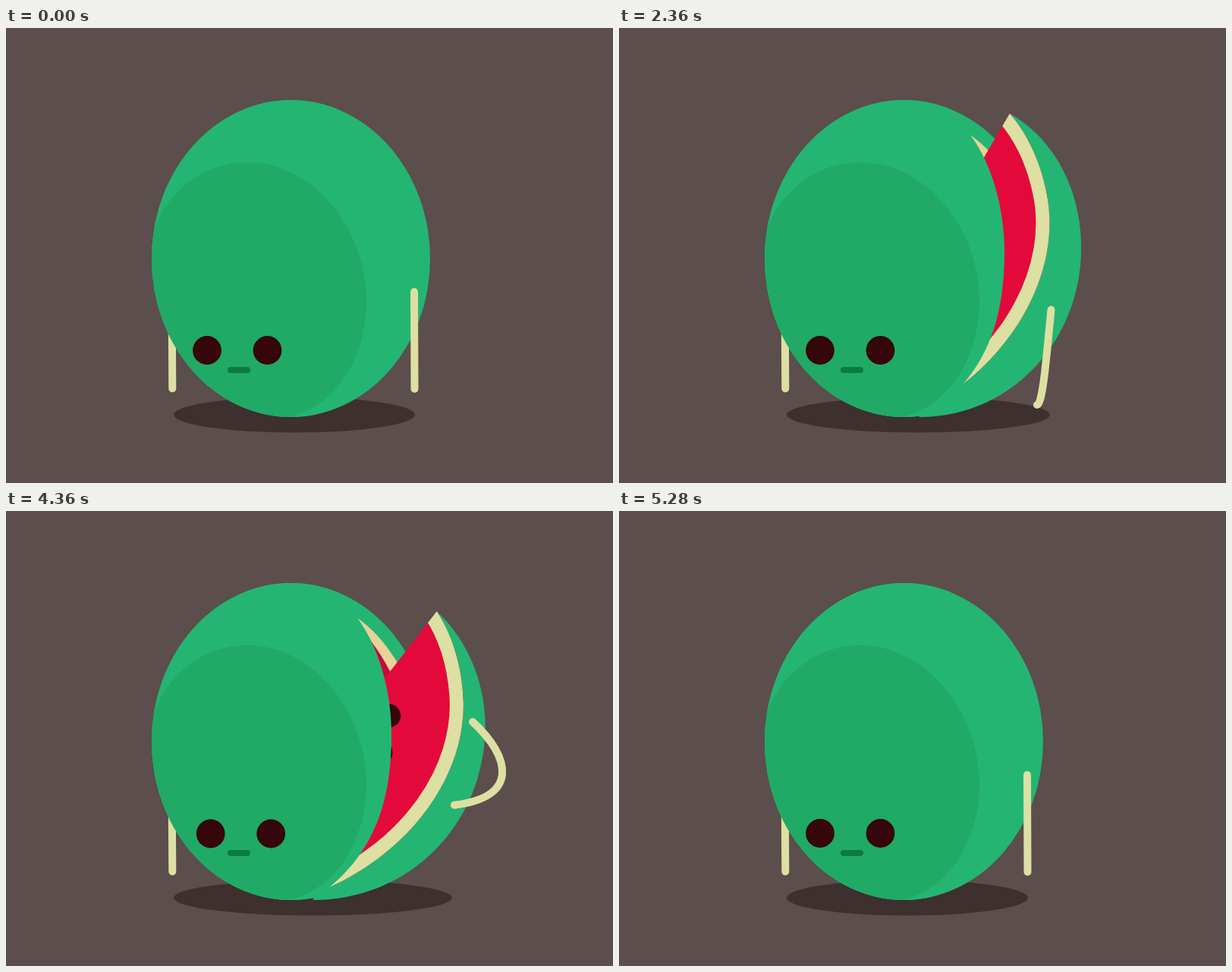
An HTML page for the animation above (5480 ms loop, 800x600 px).

```html
<!DOCTYPE html>
<html lang="en">
<head>
<meta charset="utf-8">
<title>Melon</title>
<style>
  html, body { margin: 0; width: 100%; height: 100%; overflow: hidden; background: #5b4e4c; }
  svg { display: block; width: 800px; height: 600px; }
  .limb { fill: none; stroke: #dedfa2; stroke-width: 10; stroke-linecap: round; }
  .rind { fill: #24b573; }
  .flesh { fill: #e3093b; }
  .dark { fill: #36070a; }
</style>
</head>
<body>
<svg viewBox="0 0 800 600">
  <defs>
    <clipPath id="body"><ellipse cx="375.5" cy="304" rx="183.5" ry="209"/></clipPath>
    <path id="wedge" d="M598 147C615 178 624 216 624 258C624 362 540 462 420 502L395 508L450 310Z"/>
    <clipPath id="wedgeClip"><use href="#wedge"/></clipPath>
  </defs>

  <ellipse id="shadow" cy="510" ry="23.5" fill="#3d302f"/>
  <path class="limb" d="M218.8 390L219.3 475.5"/>
  <ellipse class="rind" cx="375.5" cy="304" rx="183.5" ry="209"/>

  <g id="opening">
    <path fill="#e8d298" d="M463 141C490 160 513 190 528 224L540 300H480Z"/>
    <path fill="#c8083a" d="M463 150C485 174 504 202 517 236L528 300H480Z"/>
    <path id="outer" class="rind"/>
    <g id="face">
      <use href="#wedge" class="flesh"/>
      <g class="dark">
        <circle cx="524.5" cy="279.5" r="15.5"/>
        <path d="M490 280L505 272.5L518 265.5V294L505 288Z"/>
        <circle cx="508.5" cy="327" r="17"/>
      </g>
      <path clip-path="url(#wedgeClip)" fill="none" stroke="#dedfa2" stroke-width="36"
        d="M578 115L598 147C615 178 624 216 624 258C624 362 540 462 420 502L395 508"/>
    </g>
  </g>

  <g clip-path="url(#body)">
    <path class="rind" d="M0 0H380L420 85L463 141C492 180 508 238 508 295C508 375 490 452 412 507L395 525H0Z"/>
    <path fill="#20aa66" d="M318 177C405 177 475 265 475 360C475 435 435 500 370 514H150V330L194 268C215 210 265 177 318 177Z"/>
  </g>

  <g id="eyes" class="dark">
    <circle cx="-39.75" r="18.9"/>
    <circle cx="39.75" r="18.9"/>
  </g>
  <path d="M296 451H318" stroke="#0b7b42" stroke-width="8" stroke-linecap="round"/>
  <path id="arm" class="limb"/>
</svg>

<script>
  const LOOP = 5480, STEP = 40;
  const PIVOT = [391, 530], REACH = 435, SWING = 28.4;

  // Arm poses: shoulder, two curve handles, hand.
  const REST = [538, 348, 538, 391, 538.5, 433, 538.5, 476];
  const DROP = [569.5, 371.5, 563, 440, 558, 497, 551, 497];
  const GROUND = [601, 396, 607, 460, 598, 506, 563.5, 500];
  const LIFT = [633, 289.5, 685, 338.5, 696, 392, 600.7, 395];
  const PUSH = [518, 216, 563, 252, 568, 300, 538.5, 349];
  const LOWER = [530, 275, 578, 305, 580, 360, 545, 395];

  const $ = id => document.getElementById(id);
  const set = (id, attrs) => {
    for (const k in attrs) $(id).setAttribute(k, attrs[k]);
  };
  const span = (t, a, b) => Math.min(1, Math.max(0, (t - a) / (b - a)));
  const smooth = u => u * u * (3 - 2 * u);
  const ease = (t, a, b) => smooth(span(t, a, b));
  const mix = (a, b, u) => a + (b - a) * u;
  const blend = (p, q, u) => p.map((v, i) => mix(v, q[i], u));
  const curve = p => `M${p[0]} ${p[1]}C${p.slice(2).join(' ')}`;

  function openness(t, lag) {
    if (t < 2560) return smooth(Math.pow(span(t, 2000, 2560), lag));
    return 1 - ease(t, 4160, 4960);
  }

  function armPose(t) {
    if (t < 2560) {
      const p = 2 * openness(t, 1.57);
      return p < 1 ? blend(REST, DROP, p) : blend(DROP, GROUND, p - 1);
    }
    if (t < 4160) return blend(GROUND, LIFT, ease(t, 3800, 4160));
    if (t < 4960) return blend(LIFT, PUSH, ease(t, 4160, 4960));
    const u = 2 * ease(t, 4920, 5280);
    return u < 1 ? blend(PUSH, LOWER, u) : blend(LOWER, REST, u - 1);
  }

  // The rind behind the slice stretches from the body's outline to the open pose.
  function outerPath(q) {
    const a = SWING * q * Math.PI / 180, b = a * 1.75;
    const x = PIVOT[0] + REACH * Math.sin(a), y = PIVOT[1] - REACH * Math.cos(a);
    const h = mix(101, 40, q), right = mix(559, 645, q), ry = mix(304, 280, q);
    return `M${x} ${y}C${x + h * Math.cos(b)} ${y + h * Math.sin(b)} ` +
      `${right} ${ry - mix(115, 52, q)} ${right} ${ry}` +
      `C${right} ${mix(419, 405, q)} ${mix(477, 548, q)} 513 ${mix(375.5, 410, q)} 513Z`;
  }

  function blink(t, start) {
    const d = Math.abs(t - start - 140) / 140;
    return d < 1 ? mix(0.1, 1, smooth(d)) : 1;
  }

  function draw(t) {
    const p = openness(t, 1.57), q = openness(t, 1.33);
    const rx = (318 + 58 * p) / 2;
    set('shadow', { cx: 221 + rx, rx });
    set('opening', { visibility: q > 0.002 ? 'visible' : 'hidden' });
    set('outer', { d: outerPath(q) });
    set('face', { transform: `rotate(${SWING * (q - 1)} ${PIVOT})` });

    const look = ease(t, 3000, 3240) - ease(t, 4960, 5240);
    const lid = Math.min(blink(t, 880), blink(t, 2520));
    set('eyes', { transform: `translate(${304.75 + 4.7 * look} ${425 + 0.5 * look}) scale(1 ${lid})` });
    set('arm', { d: curve(armPose(t)) });
  }

  const begin = performance.now();
  function tick() {
    const t = (performance.now() - begin) % LOOP;
    draw(Math.floor(t / STEP) * STEP);
    requestAnimationFrame(tick);
  }
  tick();
</script>
</body>
</html>
```
